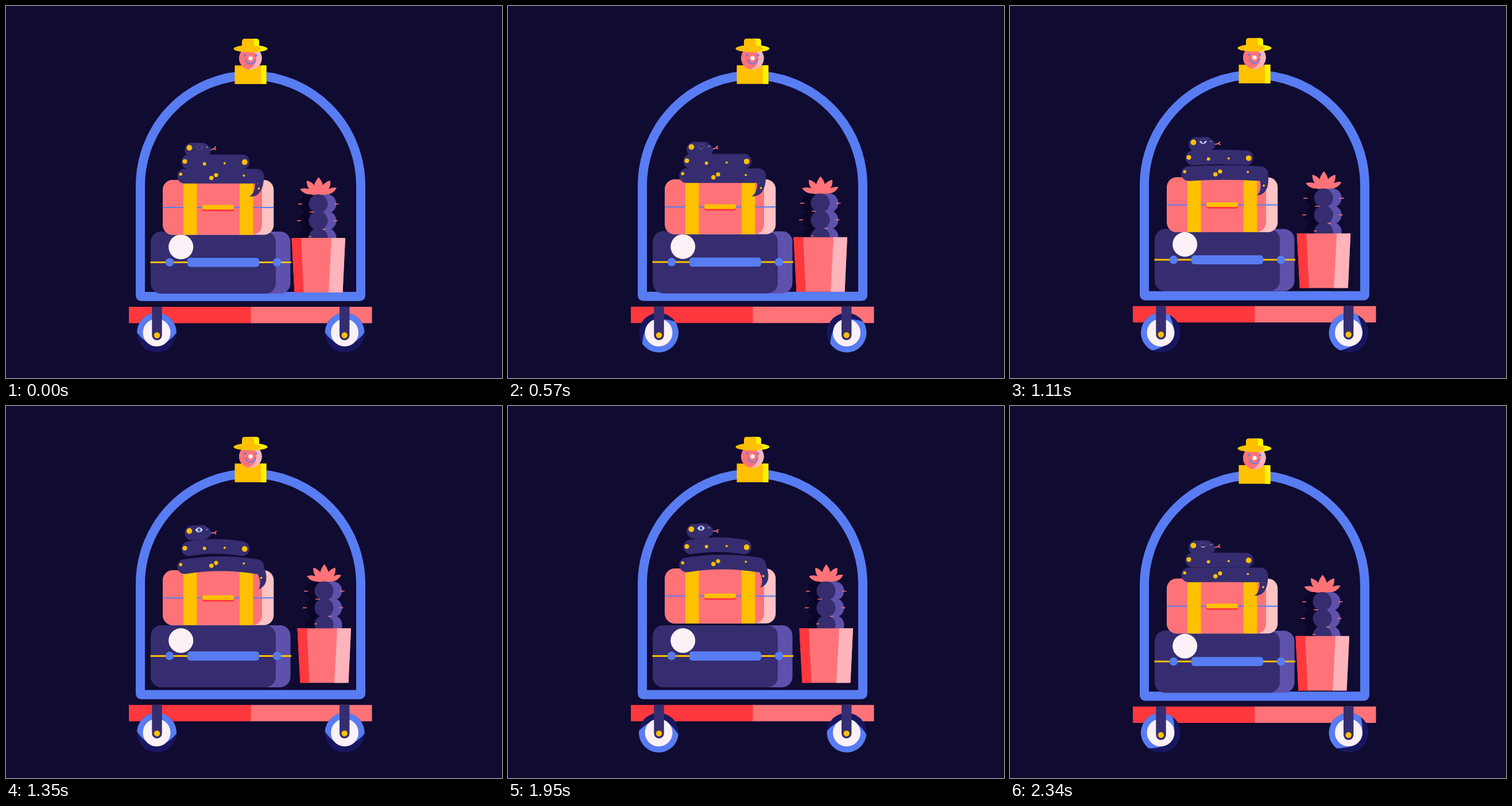
Animation of 864x648 px, one loop 2.37 s. Source, as an HTML page without scripts:

```html
<!DOCTYPE html>
<html lang="en">
<head>
<meta charset="utf-8">
<title>Bouncing luggage cart</title>
<style>
  /* --lift: shared bounce 0..1, --hop: extra bag jump in px, --turn: wheel angle */
  @property --lift { syntax: "<number>"; inherits: true; initial-value: 0; }
  @property --hop { syntax: "<number>"; inherits: true; initial-value: 0; }
  @property --turn { syntax: "<angle>"; inherits: true; initial-value: 0deg; }

  html, body { margin: 0; width: 100%; height: 100%; overflow: hidden; background: #100b31; }
  svg {
    display: block; width: 864px; height: 648px;
    --swing: cubic-bezier(.364, 0, .636, 1);
    animation: lift 2.37s var(--swing) infinite, hop 2.37s var(--swing) infinite, turn 2.37s linear infinite;
  }

  @keyframes lift {
    0%, 25.316%, 50.633%, 75.949% { --lift: 0; }
    12.658%, 37.975%, 63.291% { --lift: 1; }
    88.608% { --lift: 1; animation-timing-function: cubic-bezier(.38, 0, .67, .97); }
    100% { --lift: .025; }
  }
  @keyframes hop {
    0%, 25.316%, 46.835%, 50.633%, 75.949% { --hop: 0; }
    12.658% { --hop: 16; }
    35.443% { --hop: 24; }
    63.291% { --hop: 11; }
    88.608% { --hop: 17; }
    100% { --hop: .4; }
  }
  @keyframes turn {
    0% { --turn: 0deg; }
    16.456% { --turn: 64deg; }
    32.911% { --turn: 241deg; }
    46.835% { --turn: 296deg; }
    67.089% { --turn: 429deg; }
    82.278% { --turn: 545deg; }
    98.734% { --turn: 666deg; }
    100% { --turn: 720deg; }
  }
  @keyframes bend-low {
    0%, 25.316%, 50.633%, 75.949%, 100% { d: path("M311 296.5Q374 296.5 436.7 296.5"); }
    12.658%, 37.975%, 63.291%, 88.608% { d: path("M311 296.5Q374 276.5 436.7 296.5"); }
  }
  @keyframes bend-high {
    0%, 25.316%, 50.633%, 75.949%, 100% { d: path("M318.3 271.5Q365 271.5 411.5 271.5"); }
    12.658%, 37.975%, 63.291%, 88.608% { d: path("M318.3 271.5Q365 255.5 411.5 271.5"); }
  }

  .cart { transform: translateY(calc(var(--lift) * -6.2px)); }
  .case { transform: translateY(calc(var(--lift) * -22px)); }
  .bag { transform: translateY(calc(var(--lift) * -22px - var(--hop) * 1px)); }
  .rim { transform: rotate(var(--turn)); }

  .coil { fill: none; stroke: #352d6f; stroke-width: 25.5; stroke-linecap: round; }
  .low { animation: bend-low 2.37s var(--swing) infinite; }
  .high { animation: bend-high 2.37s var(--swing) infinite; }
  .upper { transform: translateY(calc(var(--lift) * -12.5px)); }
  .low-spots { transform: translateY(calc(var(--lift) * -9px)); }
  .high-spots { transform: translateY(calc(var(--lift) * -8px)); }
  .tail { transform-origin: 441px 298px; transform: rotate(calc(var(--lift) * -48deg)); }
  .tail-spots { transform: translate(calc(var(--lift) * 8px), calc(var(--lift) * -4px)); }
  .head {
    transform-origin: 320px 250px;
    transform: translateY(calc(var(--lift) * -12.5px)) rotate(calc(var(--lift) * -6deg));
  }
  .tongue { transform-origin: 353px 252px; transform: rotate(calc(var(--lift) * 42deg - 20deg)); }
  .lid { transform: translateY(calc(min(var(--lift) * 2.2, 1) * -10px)); }

  .plant {
    transform: translate(
      calc(clamp(0, var(--lift) * 2.6 - .3, 1) * 10px),
      calc(var(--lift) * -29px - min(var(--lift) * 20, 2) * 1px));
  }
  .stem { transform: translateY(calc(var(--lift) * -11.5px)); }
  .flower { transform-origin: 544.5px 328px; transform: scaleX(calc(1 - var(--lift) * .13)); }

  .blue { fill: #587cf2; }
  .gold { fill: #ffc000; }
  .lemon { fill: #fff200; }
  .pink { fill: #ff7378; }
  .blush { fill: #ffb3bb; }
  .red { fill: #ff383e; }
  .plum { fill: #352d6f; }
  .violet { fill: #5e51ab; }
  .night { fill: #0b0628; }
  .white { fill: #fbf1f6; }
</style>
</head>
<body>
<svg viewBox="0 0 864 648" xmlns="http://www.w3.org/2000/svg">
  <defs>
    <g id="wheel">
      <circle r="34.5" fill="#18165f"/>
      <path class="rim blue" d="M-34.5 0A34.5 34.5 0 0 1 34.5 0Q0 44 -34.5 0Z"/>
      <circle class="white" r="24"/>
    </g>
    <g id="fork">
      <path class="plum" d="M-8.7 524H8.7V573.5A8.7 8.7 0 0 1 -8.7 573.5Z"/>
      <circle class="gold" cy="573.5" r="5.2"/>
    </g>
    <g id="balls">
      <circle cy="344.5" r="16.5"/>
      <circle cy="374" r="16.5"/>
      <circle cy="403.5" r="16.5"/>
    </g>
    <clipPath id="face"><circle cx="426" cy="91" r="20"/></clipPath>
    <clipPath id="almond"><path d="M330 246Q336.5 237.5 343 246Q336.5 254.5 330 246Z"/></clipPath>
  </defs>

  <g class="cart">
    <path d="M234 313A192 192 0 0 1 618 313V504Q618 506 616 506H236Q234 506 234 504Z" fill="none" stroke="#587cf2" stroke-width="16" stroke-linejoin="round"/>
    <!-- bellhop -->
    <path class="gold" d="M398.5 103.5H453.5V136H398.5Z"/>
    <path class="lemon" d="M444 103.5H453.5V136H444Z"/>
    <g clip-path="url(#face)">
      <circle class="blush" cx="426" cy="91" r="20"/>
      <circle class="pink" cx="415" cy="91" r="21"/>
    </g>
    <g class="blue">
      <circle cx="416.3" cy="86" r="2"/>
      <circle cx="435.7" cy="86" r="2"/>
    </g>
    <path d="M417.5 92.5A8.5 8.5 0 0 0 434.5 92.5" fill="none" stroke="#587cf2" stroke-width="2"/>
    <circle class="white" cx="426" cy="91" r="3.8"/>
    <path class="lemon" d="M426 57H436Q441 57 441 62V69Q455.500 71 455.500 74.500C455.500 78 442 80.500 426 80.500Z"/>
    <path class="gold" d="M416 57H427Q432 57 432 62V69Q444 71 444 75Q440 80.500 426 80.500C410 80.500 396.500 78 396.500 74.500Q396.500 71 411 69V62Q411 57 416 57Z"/>
    <!-- platform -->
    <path class="pink" d="M426 524H637.500V552.500H426Z"/>
    <path class="red" d="M214 524H426.500V552.500H214Z"/>
  </g>

  <use href="#wheel" x="262.5" y="569"/>
  <use href="#wheel" x="590" y="569"/>
  <g class="cart">
    <use href="#fork" x="263"/>
    <use href="#fork" x="589.7"/>
  </g>

  <g class="case">
    <rect class="violet" x="252.500" y="393" width="243" height="108" rx="18"/>
    <rect class="plum" x="252.500" y="393" width="217.500" height="108" rx="18"/>
    <path d="M251.500 446.500H497" stroke="#ffc000" stroke-width="3"/>
    <g class="blue">
      <circle cx="285" cy="446.500" r="7.300"/>
      <circle cx="472" cy="446.500" r="7.300"/>
      <rect x="316" y="438.700" width="125" height="15.800" rx="5"/>
    </g>
    <circle class="white" cx="304.700" cy="419.700" r="21.500"/>
  </g>

  <g class="bag">
    <rect x="273.300" y="303" width="193" height="95.500" rx="17" fill="#ffc3c3"/>
    <rect class="pink" x="273.300" y="303" width="172.700" height="95.500" rx="17"/>
    <path d="M273.300 351H466.300" stroke="#587cf2" stroke-width="2"/>
    <path class="gold" d="M309 303H332.500V398.500H309ZM407 303H430.500V398.500H407Z"/>
    <rect class="red" x="342" y="349" width="55" height="8.500" rx="3"/>
    <rect class="gold" x="342" y="346.500" width="55" height="8" rx="3"/>

    <!-- snake -->
    <path class="tail plum" d="M433 298Q437 324 424 332Q448 334 449.500 297Z"/>
    <g class="tail-spots gold">
      <circle cx="440.500" cy="318" r="1.900"/>
      <circle cx="438" cy="308" r="1.800"/>
    </g>
    <path class="coil low" d="M311 296.500Q374 296.500 436.700 296.500"/>
    <g class="gold">
      <circle cx="304.300" cy="293" r="2.800"/>
      <g class="low-spots">
        <circle cx="357.800" cy="299.500" r="3.800"/>
        <circle cx="366" cy="294.500" r="3.600"/>
        <circle cx="414.300" cy="295.500" r="1.900"/>
      </g>
    </g>
    <g class="upper">
      <path class="coil high" d="M318.300 271.500Q365 271.500 411.500 271.500"/>
      <g class="gold">
        <circle cx="311.500" cy="270.700" r="4"/>
        <circle cx="415.700" cy="272" r="4.900"/>
        <g class="high-spots">
          <circle cx="345.700" cy="275" r="2.900"/>
          <circle cx="380.800" cy="274" r="2"/>
        </g>
      </g>
      <g class="head">
        <path class="tongue" d="M352 252H363L367 249.500M363 252L366 255" fill="none" stroke="#ff7378" stroke-width="1.800"/>
        <path class="plum" d="M324 238H341Q347 238 350 241.500Q357 245 357.500 252Q357 258 352 260Q348 263.500 343 263.500H324A12.700 12.700 0 0 1 324 238Z"/>
        <circle class="gold" cx="319.500" cy="247" r="4.900"/>
        <circle class="white" cx="350" cy="246" r=".9"/>
        <g clip-path="url(#almond)">
          <path class="white" d="M329 240H344V252H329Z"/>
          <circle class="blue" cx="336.500" cy="246" r="3.200"/>
          <ellipse class="plum" cx="336.500" cy="246" rx="1" ry="3"/>
          <ellipse class="lid plum" cx="336.500" cy="245" rx="9" ry="5.600"/>
        </g>
      </g>
    </g>
  </g>

  <g class="plant">
    <g class="stem">
      <path class="flower pink" d="M544.500 298Q551 306 552 312Q557 306 565 304Q566 313 562 319Q569 315 576 317Q570 328 556 329H533Q518 328 512 319Q520 316 528 319Q523 311 524 304Q532 306 537 312Q538 306 544.500 298Z"/>
      <use class="night" href="#balls" x="528"/>
      <use class="violet" href="#balls" x="559"/>
      <use class="plum" href="#balls" x="544"/>
      <path d="M509 345H516M572 345H579.500M529 359H537M507 374H514M570.500 374H577.500M551 389H557M527 402H532" stroke="#ff7378" stroke-width="1.500"/>
    </g>
    <path class="pink" d="M497.500 404H591L586.500 499H502.500Z"/>
    <path class="red" d="M497.500 404H514L518.500 499H502.500Z"/>
    <path class="blush" d="M567 404H591L586.500 499H562Z"/>
  </g>
</svg>
</body>
</html>
```
